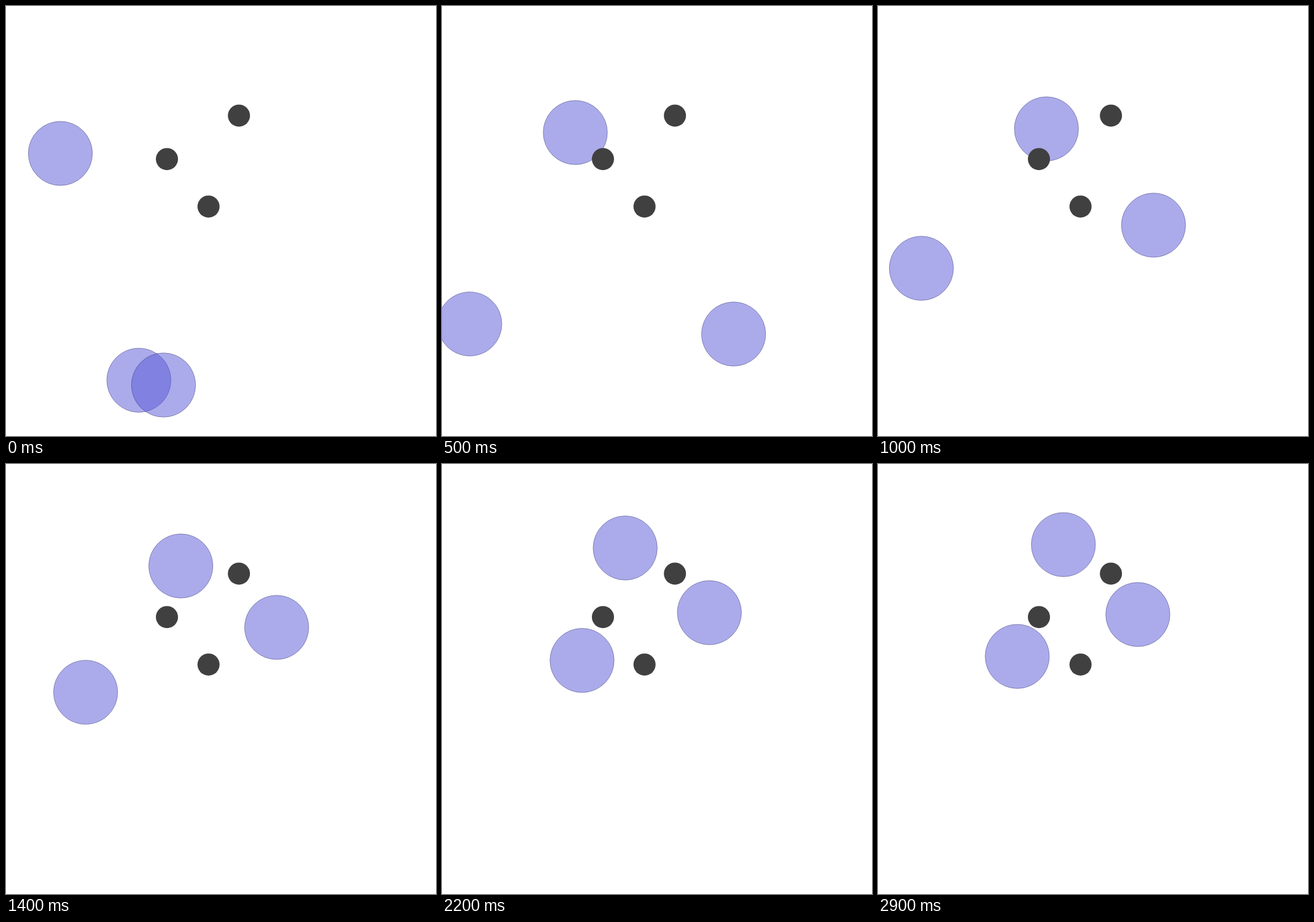
Recreate the animation shown at these times as an HTML page. Size 700x700 px, loop 3000 ms.

```html
<!DOCTYPE html>
<html lang="en">
<head>
<meta charset="utf-8">
<title>Drifting circles</title>
<style>
  html, body { margin: 0; width: 100%; height: 100%; overflow: hidden; background: #fff; }
  svg { display: block; width: 100%; height: 100%; }
  .disc { fill: rgb(88, 88, 216); fill-opacity: .5; stroke: rgb(45, 45, 105); stroke-opacity: .55; stroke-width: .8; }
  .dot { fill: #404040; }
</style>
</head>
<body>
<svg viewBox="0 0 700 700">
  <circle class="disc" r="52.2"/>
  <circle class="disc" r="52.2"/>
  <circle class="disc" r="52.2"/>
  <circle class="dot" cx="379.2" cy="178.4" r="18"/>
  <circle class="dot" cx="262" cy="249.2" r="18"/>
  <circle class="dot" cx="329.7" cy="326.4" r="18"/>
</svg>
<script>
const LOOP = 3000, STEP = 100;

// Way points of each disc as "x,y", reached at these steps.
const times = [0, 5, 10, 14, 18, 22, 29];
const paths = [
  "88.5,240 217,206 274.2,200 284.6,166 290.2,145.8 298.2,136.7 301.8,131.2",
  "216.3,609.2 45.2,517.6 70.6,427 129.6,371.6 197.6,335.8 228,319.8 226.7,313.2",
  "256.4,617 474.7,534 448.5,356.8 440.6,266 438.6,243 435.3,242 423,245"
];

// Smooth curve through the points; speeds follow from the neighbouring slopes.
function curve(p) {
  const last = p.length - 1;
  const gap = i => times[i + 1] - times[i];
  const slope = i => (p[i + 1] - p[i]) / gap(i);
  const speed = i => {
    if (i === 0) return 1.5 * slope(0) - 0.5 * speed(1);
    if (i === last) return 1.5 * slope(i - 1) - 0.5 * speed(i - 1);
    const a = gap(i - 1), b = gap(i);
    return (a * slope(i) + b * slope(i - 1)) / (a + b);
  };
  return t => {
    let i = 0;
    while (i < last - 1 && t >= times[i + 1]) i++;
    const h = gap(i), u = (t - times[i]) / h, w = 1 - u;
    return p[i] * w * w * (1 + 2 * u) + p[i + 1] * u * u * (3 - 2 * u)
      + h * u * w * (speed(i) * w - speed(i + 1) * u);
  };
}

const shapes = document.querySelectorAll(".disc");
const discs = paths.map((path, i) => {
  const points = path.split(" ").map(s => s.split(",").map(Number));
  return { el: shapes[i], x: curve(points.map(p => p[0])), y: curve(points.map(p => p[1])) };
});

function draw(ms) {
  const t = Math.floor((ms % LOOP) / STEP);
  for (const d of discs) {
    d.el.setAttribute("cx", d.x(t).toFixed(2));
    d.el.setAttribute("cy", d.y(t).toFixed(2));
  }
}

const start = performance.now();
function tick() {
  draw(performance.now() - start);
  requestAnimationFrame(tick);
}
draw(0);
requestAnimationFrame(tick);
</script>
</body>
</html>
```
